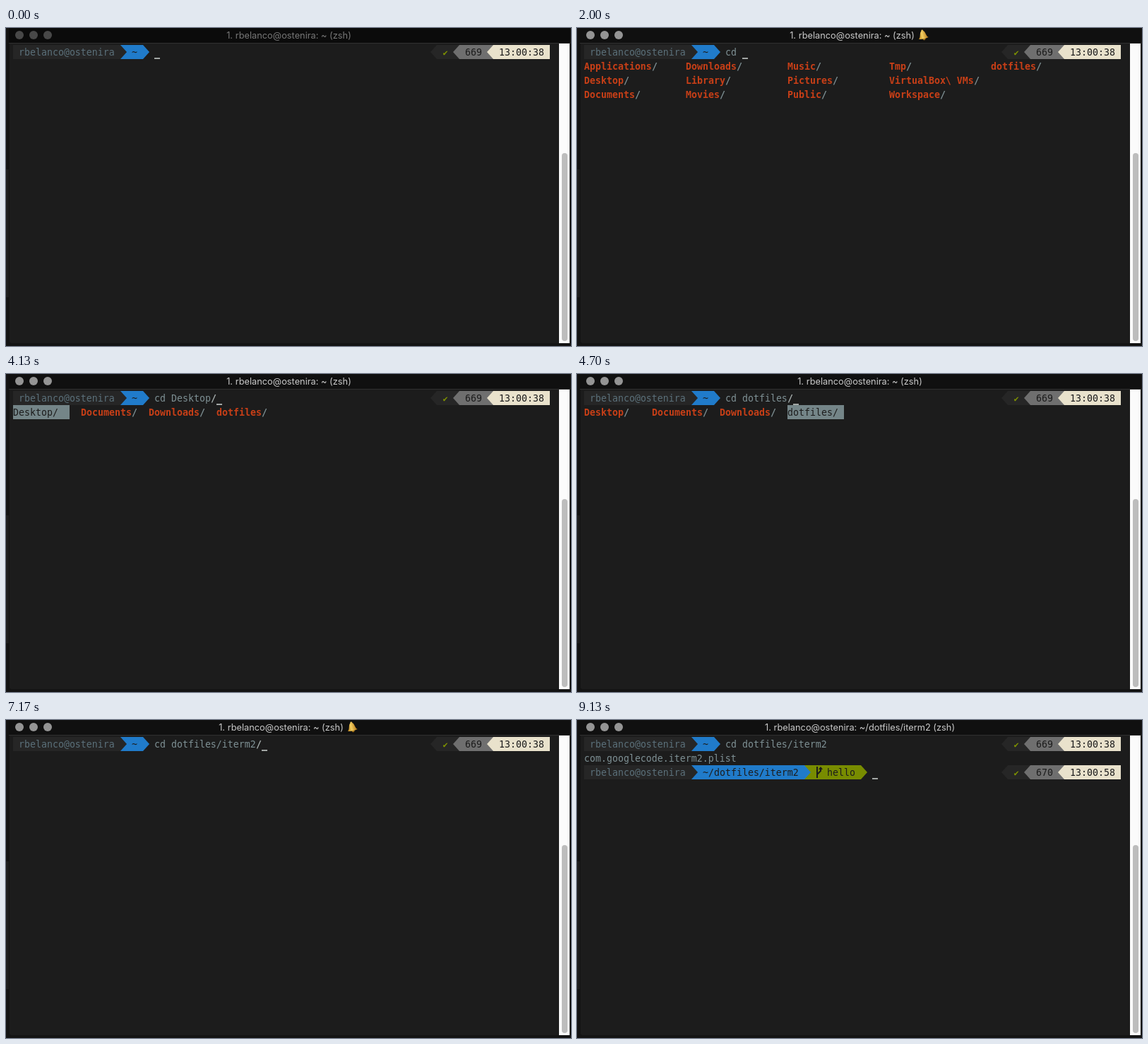
An HTML page with a canvas that plays this animation: 800x450 px, repeating every 9160 ms.

```html
<!DOCTYPE html>
<html lang="en">
<head>
<meta charset="utf-8">
<title>Terminal completion</title>
<style>
html, body { margin: 0; width: 100%; height: 100%; overflow: hidden; background: #131313; }
canvas { display: block; }
</style>
</head>
<body>
<canvas id="stage" width="800" height="450"></canvas>
<script>
const ctx = document.getElementById('stage').getContext('2d');
const LOOP = 9160, CELL = 8, ROW = 20, LEFT = 10, TOP = 24;
const USER = 'rbelanco@ostenira';
const MONO = '13.288px "DejaVu Sans Mono", monospace';
const C = {
  bg: '#1c1c1c', seg: '#262626', user: '#5b707a', text: '#7e9094', bright: '#a9b1b0',
  blue: '#207bca', green: '#788c00', gray: '#6f6f6f', cream: '#e9e2cc',
  dir: '#c83f17', select: '#748588'
};

const DIRS = ['Applications', 'Desktop', 'Documents', 'Downloads', 'Library', 'Movies',
  'Music', 'Pictures', 'Public', 'Tmp', 'VirtualBox\\ VMs', 'Workspace', 'dotfiles'];
const MENU = ['Desktop', 'Documents', 'Downloads', 'dotfiles'];

// Each step changes part of the state from its time on.
const STEPS = [
  [0, { cmd: '', focus: false, bell: false, list: '', sel: -1, done: false }],
  [1000, { focus: true }],
  [1280, { cmd: 'c' }],
  [1400, { cmd: 'cd' }],
  [1520, { cmd: 'cd ' }],
  [1780, { list: 'all', bell: true }],
  [3000, { cmd: 'cd d', bell: false }],
  [3400, { list: 'menu', bell: true }],
  [3950, { cmd: 'cd Desktop/', sel: 0, bell: false }],
  [4300, { cmd: 'cd Documents/', sel: 1 }],
  [4460, { cmd: 'cd Downloads/', sel: 2 }],
  [4620, { cmd: 'cd dotfiles/', sel: 3 }],
  [4900, { list: '', sel: -1 }],
  [5300, { cmd: 'cd dotfiles/iterm2/' }],
  [6700, { bell: true }],
  [7380, { cmd: 'cd dotfiles/iterm2', bell: false, done: true }]
];

function stateAt(t) {
  const state = {};
  for (const [at, change] of STEPS) if (at <= t) Object.assign(state, change);
  return state;
}

const colX = col => LEFT + col * CELL;
const rowY = row => TOP + row * ROW;

function rect(x, y, w, h, color) {
  ctx.fillStyle = color;
  ctx.fillRect(x, y, w, h);
}

function poly(points, color) {
  ctx.fillStyle = color;
  ctx.beginPath();
  points.forEach(([x, y]) => ctx.lineTo(x, y));
  ctx.fill();
}

function write(str, col, row, color, bold) {
  ctx.font = (bold ? 'bold ' : '') + MONO;
  ctx.textAlign = 'left';
  ctx.fillStyle = color;
  ctx.fillText(str, colX(col), rowY(row) + 15);
}

// Coloured run of cells.
function band(col, len, row, color) {
  rect(colX(col), rowY(row), len * CELL, ROW, color);
}

// Triangle in one cell; dir is 1 for right, -1 for left.
function arrow(col, row, dir, color) {
  const x = colX(dir > 0 ? col : col + 1), y = rowY(row);
  poly([[x, y], [x + dir * 9, y + ROW / 2], [x, y + ROW]], color);
}

function branchIcon(col, row) {
  const x = colX(col), y = rowY(row);
  ctx.strokeStyle = C.bg;
  ctx.lineWidth = 2;
  ctx.beginPath();
  ctx.moveTo(x + 2, y + 2);
  ctx.lineTo(x + 2, y + 18);
  ctx.moveTo(x + 7, y + 5);
  ctx.lineTo(x + 7, y + 8);
  ctx.lineTo(x + 2, y + 13);
  ctx.stroke();
  poly([[x + 4, y + 6], [x + 7, y + 2], [x + 10, y + 6]], C.bg);
}

function prompt(row, path, branch) {
  const end = 21 + path.length + 1;
  band(0, 19, row, C.seg);
  write(USER, 1, row, C.user);
  band(19, end - 19, row, C.blue);
  arrow(19, row, 1, C.seg);
  write(path, 21, row, C.bg);
  if (!branch) return arrow(end, row, 1, C.blue);
  const stop = end + 4 + branch.length + 1;
  band(end, stop - end, row, C.green);
  arrow(end, row, 1, C.blue);
  branchIcon(end + 2, row);
  write(branch, end + 4, row, C.bg);
  arrow(stop, row, 1, C.green);
}

function status(row, number, clock) {
  band(75, 3, row, C.seg);
  arrow(74, row, -1, C.seg);
  band(78, 1, row, C.seg);
  ctx.font = '12px "DejaVu Sans Mono", "DejaVu Sans", monospace';
  ctx.textAlign = 'center';
  ctx.fillStyle = '#7f9200';
  ctx.fillText('\u2714', colX(76) + 4, rowY(row) + 15);
  band(79, 6, row, C.gray);
  arrow(78, row, -1, C.gray);
  write(number, 80, row, C.bg);
  band(85, 10, row, C.cream);
  arrow(84, row, -1, C.cream);
  write(clock, 86, row, C.bg);
}

function cursor(col, row) {
  rect(colX(col), rowY(row) + 18, CELL, 2, '#a3a7a5');
}

function folder(name, col, row) {
  write(name, col, row, C.dir, true);
  write('/', col + name.length, row, C.text, true);
}

function bell(x, y) {
  ctx.save();
  ctx.translate(x, y);
  ctx.rotate(-0.2);
  ctx.fillStyle = '#9b6d18';
  ctx.beginPath();
  ctx.arc(0.5, 5.4, 2, 0, 7);
  ctx.fill();
  const gold = ctx.createLinearGradient(-6, 0, 6, 0);
  gold.addColorStop(0, '#c48b21');
  gold.addColorStop(0.4, '#f3cf62');
  gold.addColorStop(1, '#b67a1c');
  ctx.fillStyle = gold;
  ctx.beginPath();
  ctx.arc(0, -6.2, 1.5, 0, 7);
  ctx.fill();
  ctx.beginPath();
  ctx.moveTo(-7, 4.6);
  ctx.bezierCurveTo(-3, 2, -5, -6, 0, -6);
  ctx.bezierCurveTo(5, -6, 3, 2, 7, 4.6);
  ctx.quadraticCurveTo(0, 6.8, -7, 4.6);
  ctx.fill();
  ctx.restore();
}

function frame(s) {
  rect(0, 0, 800, 450, '#131313');
  rect(0, 200, 4, 181, '#1d1d1d');
  rect(4, 0, 795, 21, s.focus ? '#101010' : '#0b0b0b');
  rect(4, 21, 795, 1, '#303030');
  ctx.fillStyle = C.bg;
  ctx.beginPath();
  ctx.roundRect(5, 22, 793, 424, [0, 0, 3, 3]);
  ctx.fill();
  rect(783, 22, 15, 424, '#fbfbfb');
  ctx.fillStyle = '#bdbdbd';
  ctx.beginPath();
  ctx.roundRect(787, 177, 8, 266, 4);
  ctx.fill();

  ctx.fillStyle = s.focus ? '#949494' : '#484848';
  for (const x of [19, 39, 59]) {
    ctx.beginPath();
    ctx.arc(x, 10, 6, 0, 7);
    ctx.fill();
  }

  ctx.font = '12.8px Inter, "Open Sans", sans-serif';
  ctx.textAlign = 'center';
  ctx.fillStyle = s.focus ? '#c9c9c9' : '#777777';
  const path = s.done ? '~/dotfiles/iterm2' : '~';
  ctx.fillText(`1. ${USER}: ${path} (zsh)`, s.bell ? 389.5 : 400.5, 15);
  if (s.bell) bell(490, 10);
}

function lists(s) {
  if (s.list === 'all') {
    DIRS.forEach((name, i) => folder(name, Math.floor(i / 3) * 18, 1 + i % 3));
  } else if (s.list === 'menu') {
    MENU.forEach((name, i) => {
      if (i !== s.sel) return folder(name, i * 12, 1);
      band(i * 12, 10, 1, C.select);
      write(name + '/', i * 12, 1, C.bg);
    });
  }
}

function draw(t) {
  const s = stateAt(t);
  frame(s);
  prompt(0, '~');
  status(0, '669', '13:00:38');
  const slash = s.cmd.endsWith('/');
  write(slash ? s.cmd.slice(0, -1) : s.cmd, 25, 0, C.text);
  if (slash) write('/', 24 + s.cmd.length, 0, C.bright, true);
  lists(s);
  if (s.done) {
    write('com.googlecode.iterm2.plist', 0, 1, C.text);
    prompt(2, '~/dotfiles/iterm2', 'hello');
    status(2, '670', '13:00:58');
    cursor(51, 2);
  } else {
    cursor(25 + s.cmd.length, 0);
  }
}

const start = performance.now();
function tick() {
  draw((performance.now() - start) % LOOP);
  requestAnimationFrame(tick);
}
tick();
</script>
</body>
</html>
```
